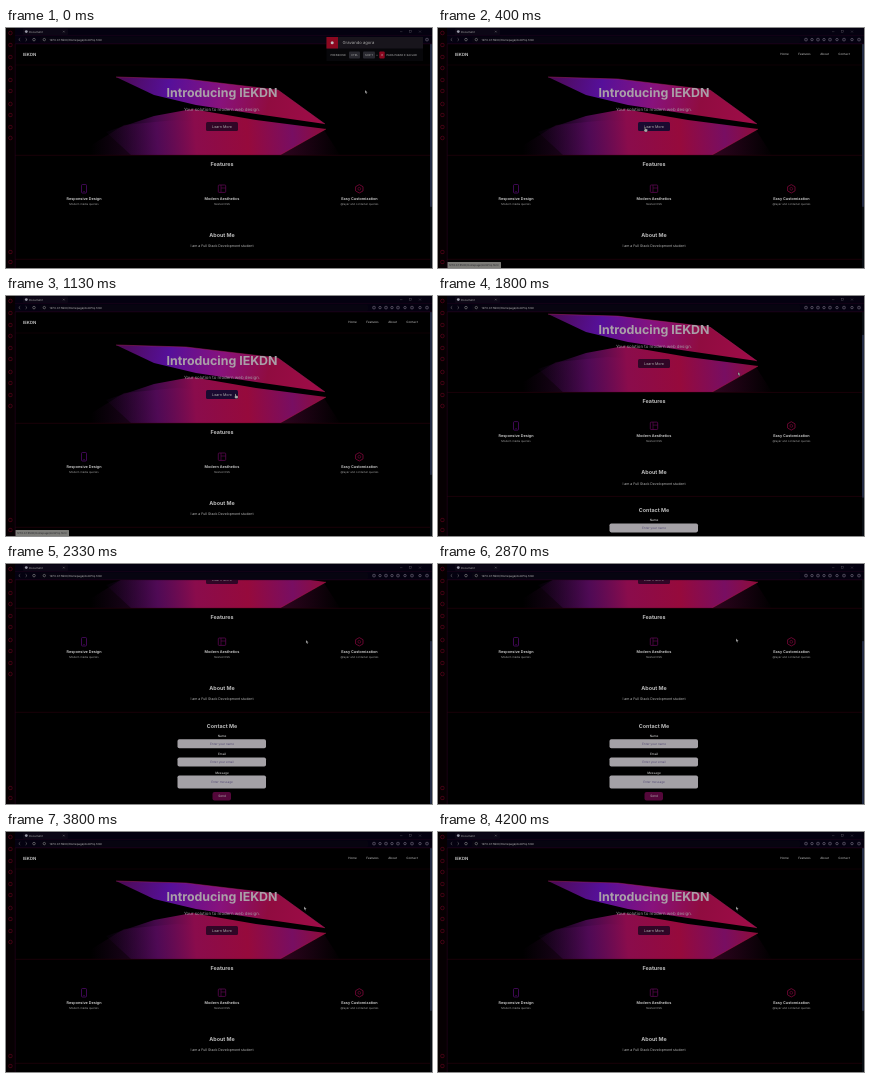
Animation, 426 px wide and 240 px high, one loop 4270 ms. Source, as an HTML page:

```html
<!DOCTYPE html>
<html lang="en">
<head>
<meta charset="utf-8">
<style>
html, body { margin: 0; width: 100%; height: 100%; overflow: hidden; background: #000; }
svg { display: block; width: 100vw; height: 100vh; }
text { font-family: Inter, "Open Sans", sans-serif; text-rendering: geometricPrecision; }
</style>
</head>
<body>
<svg id="stage" viewBox="0 0 426 240"></svg>
<script>
const LOOP = 4270, STEP = LOOP / 64, MAX_SCROLL = 83;

const rect = (x, y, w, h, fill, r = 0, extra = '') =>
  `<rect x="${x}" y="${y}" width="${w}" height="${h}" rx="${r}" fill="${fill}" ${extra}/>`;
const text = (s, x, y, size, fill = '#aaa', weight = 400, anchor = 'middle') =>
  `<text x="${x}" y="${y}" font-size="${size}" fill="${fill}" font-weight="${weight}" text-anchor="${anchor}">${s}</text>`;
const shape = (d, fill, extra = '') => `<path d="${d}" fill="${fill}" ${extra}/>`;
const line = (d, color, width = .6) => shape(d, 'none', `stroke="${color}" stroke-width="${width}"`);
const box = (x, y, w, h, color, r = .8, width = .6) => rect(x, y, w, h, 'none', r, `stroke="${color}" stroke-width="${width}"`);
const ring = (x, y, r, color) => `<circle cx="${x}" cy="${y}" r="${r}" fill="none" stroke="${color}" stroke-width=".6"/>`;
const gradient = (id, coords, stops) => `<linearGradient id="${id}" gradientUnits="userSpaceOnUse" ${coords}>` +
  stops.map(([at, color, alpha = 1]) => `<stop offset="${at}" stop-color="${color}" stop-opacity="${alpha}"/>`).join('') +
  '</linearGradient>';

const defs = `<defs>
  <clipPath id="view"><rect x="9" y="16" width="415" height="224"/></clipPath>
  <clipPath id="heroBox"><rect x="9" y="37" width="415" height="90"/></clipPath>
  ${gradient('lid', 'x1="110" y1="50" x2="320" y2="95"',
    [[0, '#4c0a50'], [.25, '#56109a'], [.5, '#88127c'], [.72, '#900c40'], [1, '#a00c48']])}
  ${gradient('base', 'x1="95" y1="115" x2="320" y2="100"',
    [[0, '#2a0640', 0], [.25, '#5c0c64', .75], [.42, '#8a0c4c'], [.65, '#960a3c'], [.85, '#780e62'], [1, '#900c38']])}
  ${gradient('spill', 'x1="85" y1="0" x2="335" y2="0"',
    [[0, '#500850', 0], [.25, '#500850', .5], [.75, '#600840', .5], [1, '#600840', 0]])}
</defs>`;

const hero = `<g clip-path="url(#heroBox)">
  ${shape('M84 118L118 97L170 92L318 102L334 127H84Z', 'url(#spill)')}
  ${shape('M110 49L180 51L272 62L319 96L250 86L190 77L148 67Z', 'url(#lid)')}
  ${shape('M100 104L148 88L186 81L250 92L320 101L274 127H125Z', 'url(#base)')}
  ${line('M110 49L180 51L272 62L319 96', '#a0205c', .5)}
  ${line('M320 101L274 127', '#b01848', .5)}
</g>`;

const feature = (x, title, note) => text(title, x, 171.9, 3.75, '#bbb', 700) + text(note, x, 177, 2.75, '#a0a0a0');

const field = (label, placeholder, y, top, h) =>
  text(label, 216, y, 3.1, '#aaa', 600) + rect(171.5, top, 88.5, h, '#a4a1a6', 1.8) +
  text(placeholder, 216, top + h / 2 + 1, 3.1, '#595078');

const page = `<g clip-path="url(#view)"><g id="page">
  ${text('IEKDN', 17, 27.5, 4.3, '#bbb', 700, 'start')}
  ${[['Home', 346.5], ['Features', 366.5], ['About', 386.5], ['Contact', 406]]
    .map(([s, x]) => text(s, x, 27, 3, '#aaa', 500)).join('')}
  ${line('M9 37H424', '#18000a', .6)}
  ${hero}
  ${text('Introducing IEKDN', 216, 69, 12.4, '#aaa0a8', 700)}
  ${text('Your solution to modern web design.', 216, 83, 4.4, '#a398a3')}
  ${rect(200, 94, 32, 9, '#300626', 1.5, 'id="button"')}
  ${text('Learn More', 216, 99.8, 3.65, '#aaa')}
  ${line('M9 127.3H424', '#2c000e', .6)}
  ${text('Features', 216, 138, 5.4, '#bbb', 700)}
  ${box(75.5, 156.5, 5, 8.5, '#5a0c78', 1, .7)}
  ${line('M77.3 163.5H78.8', '#5a0c78')}
  ${box(212.3, 157, 7.4, 7.4, '#680a5c', .8, .7)}
  ${line('M215 157V164.4M215 160H219.7', '#680a5c')}
  ${line('M353.3 156.6L357 158.7V162.9L353.3 165L349.6 162.9V158.7Z', '#80083c', .8)}
  ${ring(353.3, 160.8, 1.4, '#80083c')}
  ${feature(78, 'Responsive Design', 'Modern media queries')}
  ${feature(216, 'Modern Aesthetics', 'Nested CSS')}
  ${feature(353.5, 'Easy Customization', '@layer and container queries')}
  ${text('About Me', 216, 209.2, 5.4, '#bbb', 700)}
  ${text('I am a Full Stack Development student', 216, 219.4, 3.5, '#b4b4b4')}
  ${line('M9 231.3H424', '#2c000e', .6)}
  ${text('Contact Me', 216, 246.8, 5.4, '#bbb', 700)}
  ${field('Name', 'Enter your name', 256, 258.3, 9)}
  ${field('Email', 'Enter your email', 274.4, 276.5, 9)}
  ${field('Message', 'Enter message', 292.6, 294.5, 13)}
  ${rect(206.5, 311, 18.5, 8.5, '#54073a', 2)}
  ${text('Send', 216, 316.4, 3.2, '#aaa')}
</g></g>`;

const sideIcons = [5, 17, 29, 40, 52, 63, 76, 87, 99, 110, 224, 234]
  .map((y, i) => i % 3 ? box(2.8, y - 1.6, 3.2, 3.2, '#6c0420') : ring(4.4, y, 1.8, '#6c0420')).join('');
const toolIcons = [368, 374, 380, 386, 392, 399, 406, 414, 421]
  .map((x, i) => i % 2 ? ring(x, 11.6, 1.2, '#7c7688') : box(x - 1.2, 10.4, 2.4, 2.4, '#7c7688', .4)).join('');

const chrome = `
  ${rect(0, 0, 426, 16, '#040110')}
  ${rect(0, 0, 9, 240, '#060002')}
  ${rect(17, .5, 45, 6.5, '#0c0716', 1)}
  ${rect(34, 8.5, 328, 6.5, '#070410', 1.5)}
  ${line('M9 7.4H426', '#22031c', .5)}
  ${line('M9.2 240V15.8H426', '#2c0320', .6)}
  ${sideIcons}${toolIcons}
  <circle cx="20.3" cy="3.6" r="1.4" fill="#9a9aa8"/>
  ${text('Document', 23, 4.7, 2.8, '#aaa', 400, 'start')}
  ${line('M57 2.8l1.6 1.6m0-1.6l-1.6 1.6', '#888', .4)}
  ${line('M394 3.6h2.4M413 2.6l2 2m0-2l-2 2', '#55505c', .4)}
  ${box(403.5, 2.6, 2, 2, '#55505c', 0, .4)}
  ${line('M14.2 10.3l-1.4 1.3l1.4 1.3M19.6 10.3l1.4 1.3l-1.4 1.3', '#888', .5)}
  ${ring(28, 11.6, 1.3, '#888')}${ring(38.3, 11.6, 1.2, '#888')}
  ${text('127.0.0.1:5500/Homepage/domProj.html', 43.5, 12.6, 2.8, '#bbb', 400, 'start')}
  ${rect(424, 16, 2, 224, '#0a0e14')}
  ${rect(424.2, 16, 1.6, 163, '#2a3450', .7, 'id="thumb"')}`;

const status = `<g id="status">
  ${rect(9.5, 234, 53.5, 6, '#7c7c78', .5)}
  ${text('127.0.0.1:5500/Homepage/domProj.html', 11, 238, 2.65, '#29292d', 400, 'start')}
</g>`;

const notice = `<g id="notice">
  ${rect(320.5, 9, 96.5, 24, '#07070a')}
  ${rect(320.5, 9, 96.5, 11.5, '#18151c')}
  ${rect(320.5, 9, 11.5, 11.5, '#8c0820')}
  <circle cx="326.2" cy="14.8" r="1.5" fill="#bbb"/>
  ${text('Gravando agora', 336.5, 16.4, 4.2, '#aaa', 400, 'start')}
  ${text('PRESSIONE', 324.5, 28, 2.8, '#aaa', 400, 'start')}
  ${rect(343, 23.5, 11, 7, '#292930', 1)}${text('CTRL', 348.5, 28, 2.7)}
  ${rect(357, 23.5, 12, 7, '#292930', 1)}${text('SHIFT', 363, 28, 2.7)}
  ${text('+', 371, 28, 3)}
  ${rect(373.3, 23.5, 5.4, 7, '#8c0820', 1)}${text('R', 376, 28, 2.7, '#bbb')}
  ${text('PARA PARAR E SALVAR', 380.5, 28, 2.75, '#aaa', 400, 'start')}
</g>`;

const cursor = `<g id="cursor">
  ${shape('M0 0V3.4L.9 2.7L1.5 4L2.1 3.7L1.5 2.5H2.6Z', '#aaa', 'id="arrow" stroke="#000" stroke-width=".2"')}
  ${shape('M0 0Q.5-.5 1 0V1.5L3 2V3.5L2.4 4.6H.4L-.8 2.8L0 2.6Z', '#aaa', 'id="hand" stroke="#000" stroke-width=".2"')}
</g>`;

const $ = id => document.getElementById(id);
$('stage').innerHTML = defs + page + chrome + status + notice + cursor;

// Keys are [time, ...values]
const cursorKeys = [[0, 359, 62], [60, 359, 62], [340, 206.5, 99.3], [700, 206.5, 99.3], [1070, 229, 98],
  [1200, 229, 98], [1600, 300, 76], [2300, 300, 76], [2800, 298, 74.5], [LOOP, 298, 74.5]];
const scrollKeys = [[0, 0], [1640, 0], [2030, MAX_SCROLL], [2930, MAX_SCROLL], [3270, 0], [LOOP, 0]];

function sample(keys, t) {
  const i = keys.findIndex(k => k[0] > t);
  const a = keys[i - 1], b = keys[i];
  const u = (t - a[0]) / (b[0] - a[0]), e = u * u * (3 - 2 * u);
  return a.slice(1).map((v, j) => v + (b[j + 1] - v) * e);
}

const show = (id, on) => $(id).setAttribute('visibility', on ? 'visible' : 'hidden');
const move = (id, x, y) => $(id).setAttribute('transform', `translate(${x} ${y})`);

function draw(now) {
  const t = Math.floor((now % LOOP) / STEP + .1) * STEP % LOOP;
  const [x, y] = sample(cursorKeys, t), [scroll] = sample(scrollKeys, t);
  const hover = x > 200 && x < 232 && y > 94 && y < 103;
  move('cursor', x, y);
  move('page', 0, -scroll);
  move('thumb', 0, scroll * 61 / MAX_SCROLL);
  show('hand', hover);
  show('arrow', !hover);
  show('status', hover);
  show('notice', t < 200);
  $('button').setAttribute('fill', hover ? '#1a0a30' : '#300626');
}

const start = performance.now();
function tick() {
  draw(performance.now() - start);
  requestAnimationFrame(tick);
}
tick();
</script>
</body>
</html>
```
